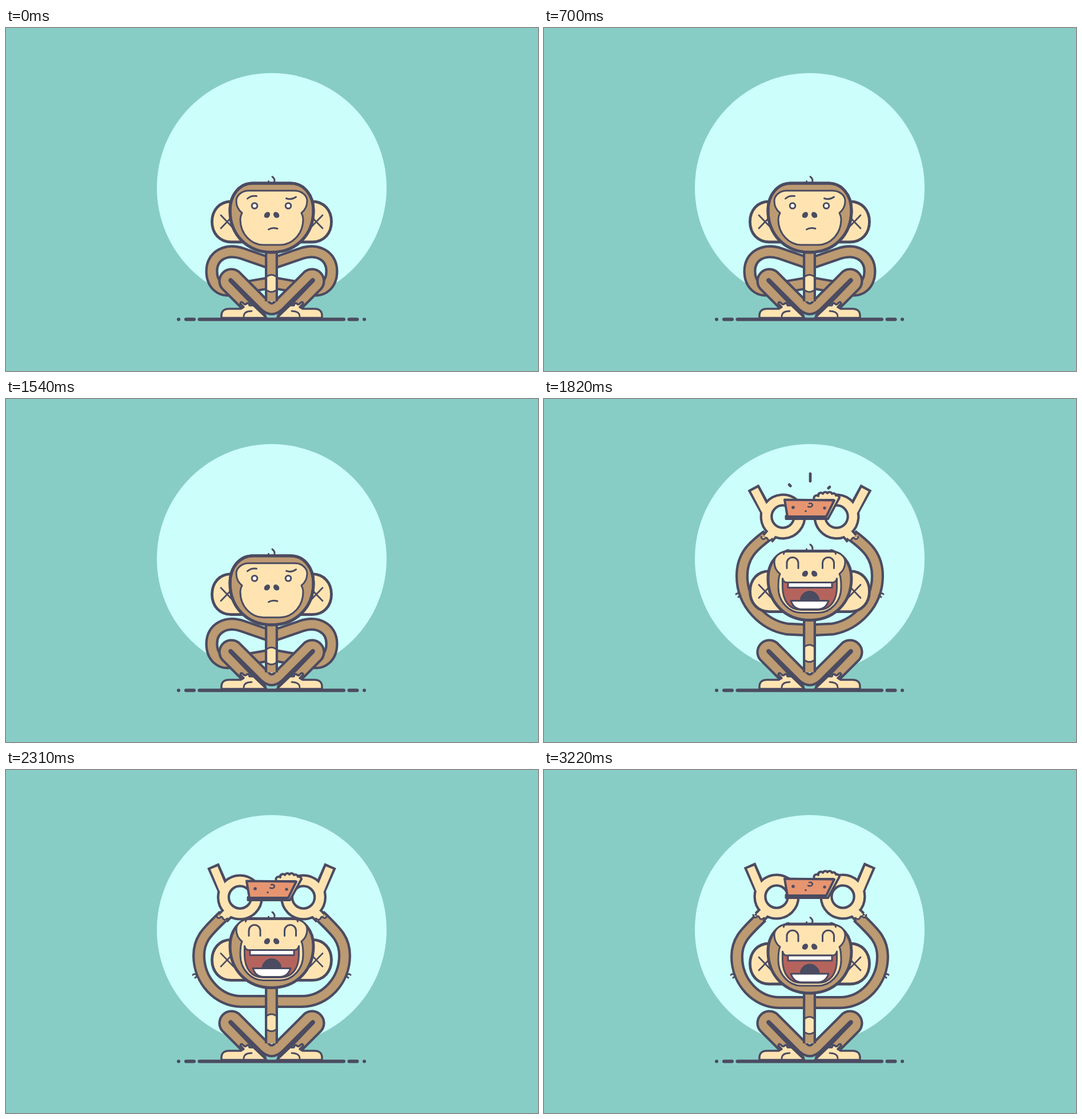
An HTML page that plays this animation: 931x601 px, repeating every 3290 ms.

```html
<!DOCTYPE html>
<html lang="en">
<head>
<meta charset="utf-8">
<title>Monkey and pie</title>
<style>
  html, body { margin: 0; width: 100%; height: 100%; overflow: hidden; background: #88cdc5; }
  svg { display: block; width: 931px; height: 601px; }
</style>
</head>
<body>
<svg id="stage" viewBox="0 0 931 601" fill="none" stroke-linecap="round" stroke-linejoin="round"></svg>
<script>
const LOOP = 3290, STEP = 70, CHEER = 1750, LANDING = 2310;
const INK = '#4b4b61', FUR = '#bc9a72', SKIN = '#ffe4b2', ORANGE = '#e69570', RED = '#b5645d';
const stage = document.getElementById('stage');

const mix = (a, b, k) => a + (b - a) * k;
const ramp = (t, a, b) => Math.min(1, Math.max(0, (t - a) / (b - a)));
const ease = (t, a, b) => { const k = ramp(t, a, b); return k * k * (3 - 2 * k); };

// Motion: lean left, lean right, crouch, throw the arms up, land and settle.
const swayAt = t => 1.4 * (ease(t, 540, 700) - ease(t, 40, 350))
  + 1.2 * (ease(t, 700, 1050) - ease(t, 1190, 1470));
const crouchAt = t => 6 * ease(t, 1400, 1700);

function cheerAt(t) {
  const rise = ease(t, 1680, 1820) - ease(t, 2170, LANDING);
  const k = ramp(t, LANDING, 2730), fade = (1 - k) ** 3;
  const dip = ease(t, 2170, LANDING) * Math.cos(3 * Math.PI * k) * fade;
  const lift = rise - .5 * Math.sin(3 * Math.PI * k) * fade;
  return { lift, dip, pie: 4 * dip - 14 * rise, head: -9.5 * dip - 3.5 * rise };
}

// Reveal runs 0 to 1 as the rays grow, 1 to 2 as they fly off.
function burstAt(t) {
  const hump = (a, b) => 1 + .12 * Math.sin(Math.PI * ramp(t, a, b));
  return t < 2240
    ? [ramp(t, 1770, 2010) + ramp(t, 2030, 2170), hump(1820, 2240)]
    : [ramp(t, 2400, 2600) + ramp(t, 3080, 3220), hump(2450, 2730)];
}

const path = (d, fill = 'none', width = 3) =>
  `<path d="${d}" fill="${fill}" stroke="${INK}" stroke-width="${width}"/>`;
const line = (d, color, width, cap = 'butt') =>
  `<path d="${d}" stroke="${color}" stroke-width="${width}" stroke-linecap="${cap}"/>`;
const tube = d => line(d, INK, 23) + line(d, FUR, 14.5);
const dot = (x, y, r, fill = INK, width = 0) =>
  `<circle cx="${x}" cy="${y}" r="${r}" fill="${fill}" stroke="${INK}" stroke-width="${width}"/>`;
const group = (transform, body) => `<g transform="${transform}">${body}</g>`;
const shift = (x, y, body) => group(`translate(${x} ${y})`, body);
const flip = body => group('translate(930 0) scale(-1 1)', body);
const pair = body => body + flip(body);

const backdrop = `<rect width="931" height="601" fill="#88cdc5"/>
  <circle cx="465" cy="280" r="201" fill="#ccfffc"/>`;
const ground = line('M302 510.5h.1M315 510.5h14M338.5 510.5h252.5M600.5 510.5h14M627 510.5h.1', INK, 6, 'round');
const foot = path('M377 508V504C377 496 382 492 390 492H411L416 489L410 483Q411 478 415 482Q418 486 421 483Q425 480 426 486L433 486L456 508Z', SKIN, 3.5)
  + path('M416 506Q416 496 430 496', 'none', 2.8);
const ear = path('M412 304H394C373 304 360.5 320 360.5 339.5C360.5 360 374 375 394 375H420Z', SKIN, 4.8)
  + path('M376 328L398 351M376 351L398 328', 'none', 2.8);
const nostril = path('M453 331C451 326 456 322 460 323.5C463 327 460 332 456 332Z', INK, 1.5);
const nose = nostril + flip(nostril);
const hair = path('M466 260.5Q472 265 469 271M459.5 268.5V270');
const skull = 'M432 272H498C521 272 538 292 538 320C538 362 508 393 465 393C422 393 392 362 392 320C392 292 409 272 432 272Z';

// k raises the brow half of the face.
const face = k => path(`M425 ${285 - k}H505c13 0 22 9 22 18c0 11 -5 17 -10 21q3 6 3 ${11 + k}
  C520 362 500 380 480 380H450C430 380 410 362 410 335q0 ${-5 - k} 3 ${-11 - k}
  c-5 -4 -10 -10 -10 -21c0 -9 9 -18 22 -18Z`, SKIN, 3);

function legs(sway) {
  const tilt = 3 * sway, x = 3.5 * sway;
  const left = [393 + x, 442 - tilt], right = [537 + x, 442 + tilt];
  const bend = `A11.5 11.5 0 0 0`;
  const [lx, ly] = left, [rx, ry] = right;
  return tube(`M419 484L${lx - 8} ${ly + 8}A11.5 11.5 0 0 1 ${lx + 8} ${ly - 8}L454 487Q465 497 476 487
      L${rx - 8} ${ry - 8}A11.5 11.5 0 0 1 ${rx + 8} ${ry + 8}L511 484`)
    + line(`M${left}L452 504M${right}L478 504`, INK, 7.5, 'round');
}

function spine(sway, drop) {
  const patch = line('M464.5 434V461', SKIN, 14.5)
    + path('M457 435Q464.5 430 472 435M457 460Q464.5 465 472 460');
  return tube(`M464.5 479Q${464.5 + 6 * sway} 445 ${464.5 + 10 * sway} 378`)
    + group(`translate(${5 * sway} ${drop}) rotate(${7 * sway} 465 447)`, patch);
}

function sadHead(s, drop) {
  const bob = Math.abs(s);
  const features =
    shift(7 * s, bob, face(0)) +
    shift(13.5 * s, 0, dot(435, 311.5, 4.8, '#fff', 3) + dot(494, 311.5, 4.8, '#fff', 3)) +
    shift(15 * s, 6 * s, path('M422.5 299Q429 293 438.5 294.5')) +
    shift(9 * s, -5 * s, path('M490.5 298.5Q499 302 507.5 296')) +
    shift(9 * s, bob, nose) +
    group(`translate(${2 * s} ${4 * bob}) rotate(${-14 * s} 467 352)`, path('M459.5 353Q466 349 475 351.5'));
  const head = shift(-2 * s, 0, hair) + path(skull, FUR, 5)
    + `<g clip-path="url(#skull)">${features}</g>` + path(skull, 'none', 5);
  return group(`translate(${s} ${1.5 * bob + drop}) rotate(${-s} 465 339)`, pair(ear))
    + group(`translate(${6 * s} ${bob + drop}) rotate(${-2 * s} 465 332)`, head);
}

function happyHead(y) {
  const mouth = path('M417.5 318Q419 325 425 325H505Q511 325 512.5 318V334C512 358 500 373 480 373H450C430 373 418 358 417.5 334Z', RED)
    + path('M448 357A17 17 0 0 1 482 357Z', INK, 1)
    + path('M432 357H498Q493 372 479 372H451Q437 372 432 357Z', '#fff')
    + path('M427 325H504V334H427Z', '#fff');
  const eye = path('M425 300V291A10 10 0 0 1 445 291V300');
  const tuft = path('M419.5 275Q420 269 428 268');
  return shift(0, y * .7, pair(ear))
    + shift(0, y, shift(0, -2, hair + path(skull, FUR, 5) + face(12)) + pair(tuft)
      + eye + shift(62.5, 0, eye) + shift(0, -18, nose) + mouth);
}

function foldedArms(s, drop) {
  const arm = tube('M465 413L413 395C386 386 360 398 360 426C360 450 376 462 393 458.5L465 446');
  return group(`translate(${5 * s} ${2 * Math.abs(s) + drop}) rotate(${2.2 * s} 465 460)`, pair(arm));
}

function raisedArm(lift, dip) {
  const p = (x0, y0, x1, y1) => `${mix(x0, x1, lift)} ${mix(y0, y1, lift)} `;
  const arm = `M${p(465, 407.5, 465, 405)}L${p(412, 407.5, 425, 403)}
    C${p(372, 407.5, 385, 396)}${p(337.5, 372, 346.5, 360)}${p(337.5, 327, 346.5, 310)}
    C${p(337.5, 296, 346.5, 275)}${p(355, 283, 365, 258)}${p(381, 257, 391, 239)}`;
  const tuft = path('M327 359Q330 356 333 359M331 364L335 361');
  return shift(0, -2 * dip, tube(arm)) + shift(9 * lift, -17 * lift, tuft);
}

function hand(lift, dip) {
  const ring = 'M436 222a29 29 0 1 1 -58 0a29 29 0 1 1 58 0Z', wrist = 'M388 247L377 258';
  const body = line('M359.8 166.5L378 208', INK, 22) + line(ring + wrist, INK, 23)
    + line('M361.5 170.5L378 210', SKIN, 13.5) + line(ring + wrist, SKIN, 14.5)
    + path('M366 254Q368 261 373 257Q376 255 377 259Q380 264 385 259', SKIN);
  return group(`translate(${11 * lift + 2.5 * dip} ${dip - 16 * lift}) rotate(${-5 * lift} 407 222)`, body);
}

const bumps = [[6, -7], [8, -4], [8, -1], [8, 1], [7, 3], [6, 4]].map(([x, y]) => `a4.6 4.6 0 0 1 ${x} ${y}`).join('');
const pieSlice = path(`M423.5 224V219H492L506 191H474${bumps}L497 224Z`, SKIN, 4)
  + path('M421 190.5L508 191.5L494 220H426Z', ORANGE, 4)
  + dot(436, 204, 2.8) + dot(491, 205, 2.6) + dot(458, 210.5, 1.7)
  + path('M462 202.5Q468 205 470 200Q469 196 464 197', 'none', 2.5);

function burst(reveal, stretch) {
  const ray = (x, y, dx, dy, reach, dashes) => dashes.map(([a, b]) => {
    const lo = Math.max(a, (reveal - 1) * reach), hi = Math.min(b, reveal * reach);
    const at = d => `${x + dx * d * stretch} ${y + dy * d * stretch}`;
    return lo > hi ? '' : line(`M${at(lo)}L${at(hi + .1)}`, INK, 4.8, 'round');
  }).join('');
  return ray(466, 160, 0, -1, 72, [[2, 30], [42, 52], [69, 69]])
    + ray(432, 167, -.707, -.707, 50, [[1, 4], [21, 43]])
    + ray(497, 171, .717, -.697, 50, [[1, 4], [19, 47]]);
}

function scene(t) {
  if (t < CHEER) {
    const sway = swayAt(t), drop = crouchAt(t);
    return `<clipPath id="skull"><path d="${skull}"/></clipPath>` + backdrop + ground
      + foldedArms(sway, drop) + legs(sway) + spine(sway, drop) + pair(foot) + sadHead(sway, drop);
  }
  const { lift, dip, pie, head } = cheerAt(t);
  return backdrop + ground + pair(raisedArm(lift, dip)) + legs(0) + spine(0, head * .5) + pair(foot)
    + happyHead(head) + pair(hand(lift, dip)) + shift(0, pie, pieSlice + burst(...burstAt(t)));
}

let shown = -1;
function tick() {
  const t = Math.floor(performance.now() % LOOP / STEP) * STEP;
  if (t !== shown) stage.innerHTML = scene(shown = t);
  requestAnimationFrame(tick);
}
tick();
</script>
</body>
</html>
```
